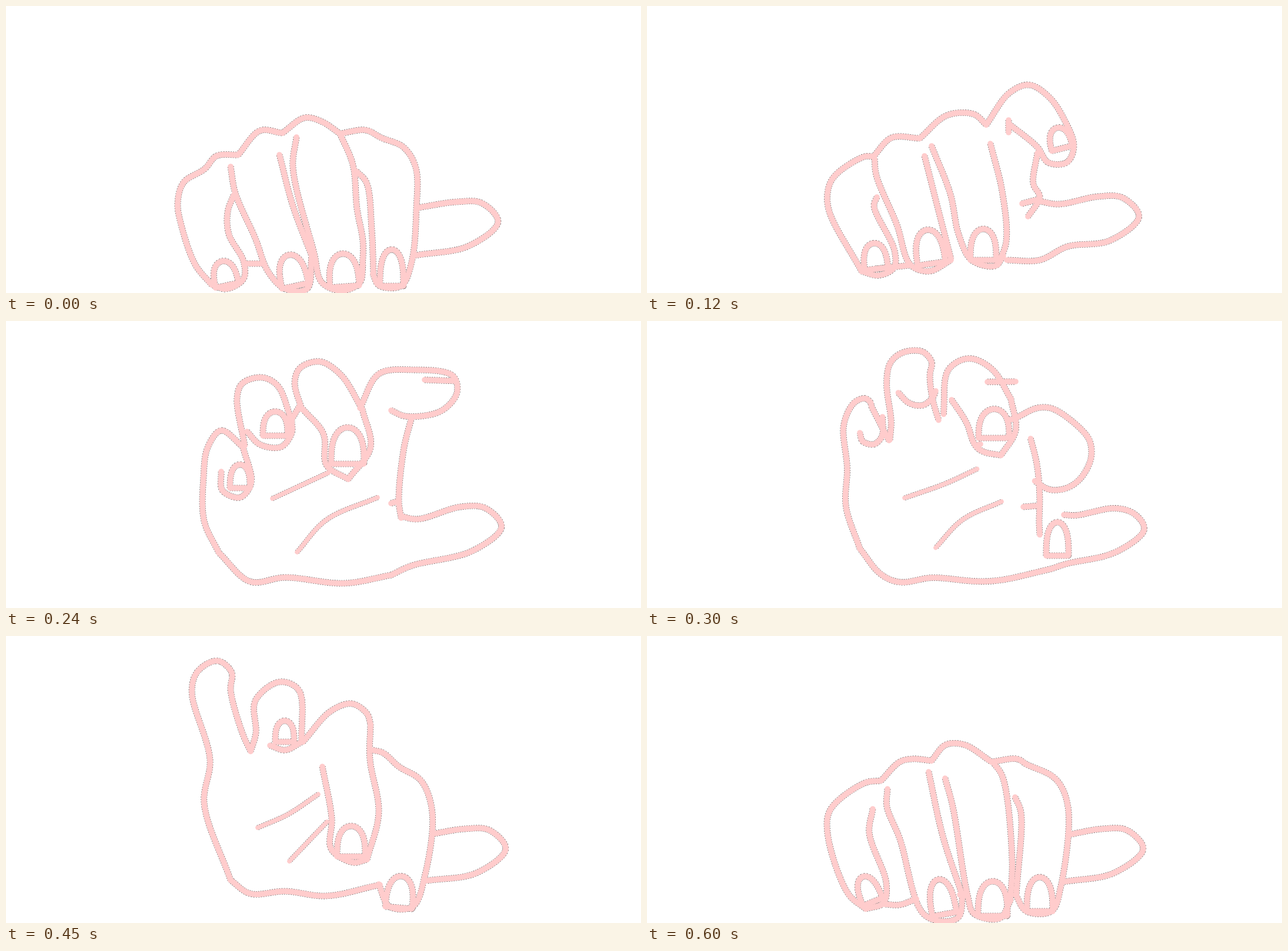
An HTML page with a canvas that plays this animation: 1080 px wide and 488 px high, repeating every 0.63 s.

```html
<!DOCTYPE html>
<html lang="en">
<head>
<meta charset="utf-8">
<title>Drumming fingers</title>
<style>
html, body { margin: 0; height: 100%; overflow: hidden; background: #fff; }
canvas { display: block; }
</style>
</head>
<body>
<canvas id="stage" width="1080" height="488"></canvas>
<script>
const LOOP = 630, STEP = 30, SAMPLES = 90;
const ctx = document.getElementById("stage").getContext("2d");
const mix = (a, b, k) => a + (b - a) * k;
const mixPoint = (a, b, k) => [mix(a[0], b[0], k), mix(a[1], b[1], k)];

function points(text) {
  const v = text.split(" ").map(Number), pts = [];
  for (let n = 0; n < v.length; n += 2) pts.push([v[n], v[n + 1]]);
  return pts;
}

// Smooth curve through unevenly spaced points.
function smooth(pts) {
  const last = pts.length - 1, gap = [], slope = [], out = [pts[0]];
  for (let n = 0; n < last; n++) {
    const dx = pts[n + 1][0] - pts[n][0], dy = pts[n + 1][1] - pts[n][1];
    gap[n] = Math.sqrt(Math.hypot(dx, dy));
    slope[n] = [dx / gap[n], dy / gap[n]];
  }
  const tangent = n => n === 0 ? slope[0] : n === last ? slope[last - 1]
    : mixPoint(slope[n - 1], slope[n], gap[n - 1] / (gap[n - 1] + gap[n]));
  for (let n = 0; n < last; n++) {
    const a = pts[n], b = pts[n + 1], ta = tangent(n), tb = tangent(n + 1);
    for (let s = 1; s <= 12; s++) {
      const u = s / 12, v = 1 - u, e = u * u * (3 - 2 * u);
      out.push([0, 1].map(j => mix(a[j], b[j], e) + gap[n] * u * v * (v * ta[j] - u * tb[j])));
    }
  }
  return out;
}

// Points at equal distances along the curve.
function resample(pts) {
  const len = [0];
  for (let n = 1; n < pts.length; n++)
    len.push(len[n - 1] + Math.hypot(pts[n][0] - pts[n - 1][0], pts[n][1] - pts[n - 1][1]));
  const total = len[len.length - 1], out = [];
  for (let s = 0, n = 1; s <= SAMPLES; s++) {
    const goal = total * s / SAMPLES;
    while (n < pts.length - 1 && len[n] < goal) n++;
    out.push(mixPoint(pts[n - 1], pts[n], (goal - len[n - 1]) / (len[n] - len[n - 1])));
  }
  return out;
}

const line = text => resample(smooth(points(text)));

// Rounded arch standing on the middle of its base, tilted in degrees.
function nail(x, y, w, h, tilt = 0) {
  const r = tilt * Math.PI / 180, c = Math.cos(r), s = Math.sin(r), pts = [];
  for (let n = 0; n <= 40; n++) {
    const u = Math.PI * n / 40;
    const px = -Math.cos(u) * w / 2, py = -h * Math.max(0, Math.sin(u)) ** 0.65;
    pts.push([x + px * c - py * s, y + px * s + py * c]);
  }
  return resample([...pts, pts[0]]);
}

function thumb(start, x, y, end) {
  const tip = [[x - 70, y - 34], [x - 28, y - 32], [x, y], [x - 50, y + 41]];
  return resample(smooth([...points(start), ...tip, ...points(end)]));
}

// Letters: p r m i = pinky, ring, middle, index (2, 3 = sides, N = nail);
// t = thumb, b = heel, w = web, c = palm crease, h = small hook.
const fist = {
  p: line("350 474 322 440 298 372 292 335 302 300 338 277 358 255 395 253"),
  p2: line("387 322 377 350 379 388 404 434 404 464 375 481 350 474"),
  b: line("436 438 406 438"),
  r: line("395 253 432 212 470 216"),
  r2: line("382 273 390 318 424 395 446 452 475 481 512 481 520 425"),
  r3: line("465 253 488 340 522 430"),
  m: line("470 216 508 190 538 197 568 217"),
  m2: line("494 223 488 275 524 420 537 470 572 484 602 470 607 440"),
  m3: line("568 217 590 270 597 345 607 400 606 450"),
  i: line("568 217 612 211 638 224 676 240 697 275 698 345 690 435 672 476 634 475 624 455"),
  i2: line("596 281 613 300 622 380 625 455"),
  t: thumb("700 343", 837, 367, "696 424"),
  pN: nail(376, 475, 40, 42, -12),
  rN: nail(492, 476, 46, 54, -12),
  mN: nail(576, 477, 50, 56, -4),
  iN: nail(656, 476, 40, 62)
};

const pointing = {
  p: line("365 451 309 346 309 308 322 286 370 256 385 256"),
  p2: line("391 325 386 340 421 416 420 445 394 458 365 451"),
  b: line("446 441 387 447"),
  r: line("385 256 416 224 464 225"),
  r2: line("387 260 390 288 425 372 448 440 480 451 517 432"),
  r3: line("472 255 495 345 517 430"),
  m: line("464 225 510 186 556 184 577 202"),
  m2: line("484 238 516 320 530 388 552 432 592 442 606 425"),
  m3: line("584 234 604 315 611 400 597 440"),
  i: line("577 202 616 148 650 134 684 155 708 190 726 238 714 266 682 266 664 240 615 200"),
  h1: line("615 194 615 215"),
  w: line("664 250 657 302 668 325 648 358"),
  h2: line("638 336 668 328"),
  t: thumb("668 332 700 337", 837, 358, "715 409 668 432 612 432"),
  pN: nail(390, 447, 40, 44, -6),
  rN: nail(484, 438, 48, 58, -8),
  mN: nail(572, 432, 44, 53),
  iN: nail(706, 242, 36, 36, -14)
};

const opening = {
  p: line("362 394 337 340 336 265 343 215 366 186 403 214"),
  p2: line("403 214 417 275 398 300 368 288 366 256"),
  b: line("655 432 575 446 475 436 415 443 362 394"),
  r: line("406 212 393 130 402 106 435 96 462 110 486 170"),
  r2: line("410 188 432 210 468 214 486 190 486 170"),
  h4: line("486 167 499 145"),
  m: line("503 150 491 105 500 80 534 69 570 92 606 150"),
  m2: line("505 150 540 192 545 245 582 269"),
  m3: line("606 150 620 215 582 269"),
  i: line("602 148 634 90 690 83 760 93 767 122 740 153 680 162 655 152"),
  h3: line("712 100 764 102"),
  w: line("690 164 677 215 668 305 672 335"),
  h2: line("655 310 668 306"),
  c1: line("453 302 548 258"),
  c2: line("632 300 545 338 495 393"),
  t: thumb("672 332 700 337", 843, 350, "690 416 655 432"),
  pN: nail(398, 284, 34, 40),
  rN: nail(458, 195, 42, 41),
  mN: nail(581, 243, 56, 62)
};

const spread = {
  p: line("362 380 338 285 347 200 332 105 364 57 394 58 404 85 398 110 420 192"),
  p2: line("398 112 358 124"),
  b: line("720 411 590 441 495 437 440 444 395 427 362 380"),
  r: line("420 192 429 150 422 75 432 26 468 4 505 9 517 38 496 68 493 115 506 167"),
  r2: line("445 56 463 71 496 68"),
  h3: line("446 107 490 104"),
  m: line("506 167 519 130 526 80 560 54 602 68 632 115"),
  m2: line("531 118 564 182 592 192 622 188"),
  m3: line("632 115 634 160 622 188"),
  i: line("624 190 650 204 715 214 738 262 742 355 720 404 690 412 664 392"),
  w: line("615 236 648 272 666 328 664 392"),
  h4: line("648 252 632 274"),
  h2: line("625 322 664 322"),
  c1: line("423 300 510 275 575 245"),
  c2: line("574 314 530 336 487 378"),
  t: thumb("746 327", 850, 355, "720 411"),
  mN: nail(599, 155, 48, 37),
  iN: nail(698, 399, 38, 57)
};

const folding = {
  p: line("382 415 337 285 347 210 316 95 326 60 360 42 384 62 382 92 402 165 416 196"),
  b: line("636 423 545 442 475 434 415 438 382 415"),
  r: line("416 196 425 165 424 110 465 78 498 92 503 180"),
  r2: line("449 186 475 194 503 180"),
  m: line("505 180 552 128 588 115 614 132 620 150"),
  m2: line("538 222 554 310 553 362 590 385 614 380"),
  m3: line("620 150 619 210 634 300 614 380"),
  i: line("624 194 642 199 668 222 706 246 725 300 713 405 692 460 652 460 634 422"),
  c1: line("428 326 480 303 531 269"),
  c2: line("546 316 482 383"),
  t: thumb("728 336", 850, 362, "716 416"),
  rN: nail(474, 180, 32, 36),
  mN: nail(587, 375, 48, 52),
  iN: nail(668, 462, 46, 54, 5)
};

const closing = {
  p: line("345 396 312 368 296 325 302 260 320 225 358 215 396 238"),
  p2: line("366 268 366 330 376 370 345 396"),
  b: line("465 450 402 450 372 425 364 392"),
  r: line("396 238 438 204 462 197 490 205"),
  r2: line("413 257 412 285 441 375 470 465 500 480 533 462 537 440"),
  r3: line("496 255 500 320 537 440"),
  m: line("490 205 515 186 545 177 595 208"),
  m2: line("511 234 542 360 549 460 580 470 614 460 620 440"),
  m3: line("597 210 620 248 619 440"),
  i: line("595 208 640 205 660 221 705 240 720 270 715 340 690 458 660 461 632 444"),
  i2: line("640 266 641 345 632 444"),
  h1: line("622 290 637 295"),
  t: thumb("718 341", 848, 365, "708 421"),
  pN: nail(345, 388, 36, 44, -22),
  rN: nail(503, 473, 38, 62, -8),
  mN: nail(584, 467, 48, 53),
  iN: nail(664, 460, 44, 50, 3)
};

const closed = {
  p: line("372 464 342 438 307 335 312 295 370 250 398 246"),
  p2: line("384 294 378 335 407 420 402 454 372 464"),
  b: line("458 447 430 457 404 456"),
  r: line("398 246 430 214 452 209 484 212"),
  r2: line("409 260 408 290 430 345 468 470 500 485 530 478 537 440"),
  r3: line("479 231 503 340 536 440"),
  m: line("484 212 508 185 540 185 586 214"),
  m2: line("507 242 520 290 545 440 556 472 600 480 618 450"),
  m3: line("588 214 605 240 621 380 618 450"),
  i: line("586 214 630 209 645 218 695 243 716 290 704 425 688 468 645 468 627 440"),
  i2: line("626 274 636 300 628 440"),
  h1: line("532 440 545 440"),
  t: thumb("716 338", 844, 362, "708 418"),
  pN: nail(384, 452, 36, 46, -22),
  rN: nail(506, 473, 42, 60, -10),
  mN: nail(588, 476, 50, 59),
  iN: nail(668, 468, 44, 58)
};

const keys = [
  [0, fist], [120, pointing], [240, opening], [360, spread],
  [450, folding], [540, closing], [600, closed], [LOOP, fist]
];

// Shared strokes blend; the others switch halfway.
function strokesAt(time) {
  const n = keys.findIndex(([at]) => at > time);
  const [t0, from] = keys[n - 1], [t1, to] = keys[n];
  const k = (time - t0) / (t1 - t0), near = k < 0.5 ? from : to;
  return Object.keys(near).map(name => {
    const a = from[name], b = to[name];
    const pts = a && b ? a.map((p, j) => mixPoint(p, b[j], k)) : near[name];
    return { pts, width: name[0] === "c" ? 7.5 : 9.6 };
  });
}

function ink(strokes, color, extra, dash, cap) {
  ctx.strokeStyle = color;
  ctx.lineCap = cap;
  ctx.lineJoin = "round";
  ctx.setLineDash(dash);
  for (const { pts, width } of strokes) {
    ctx.lineWidth = width + extra;
    ctx.beginPath();
    pts.forEach(p => ctx.lineTo(p[0], p[1]));
    ctx.stroke();
  }
}

function draw(now) {
  const strokes = strokesAt(Math.floor(now % LOOP / STEP) * STEP);
  ctx.fillStyle = "#fff";
  ctx.fillRect(0, 0, 1080, 488);
  ink(strokes, "#555", 1.1, [2, 2], "butt");
  ink(strokes, "#ffcccc", 0, [], "round");
}

let start;
function tick(now) {
  start ??= now;
  draw(now - start);
  requestAnimationFrame(tick);
}
draw(0);
requestAnimationFrame(tick);
</script>
</body>
</html>
```
